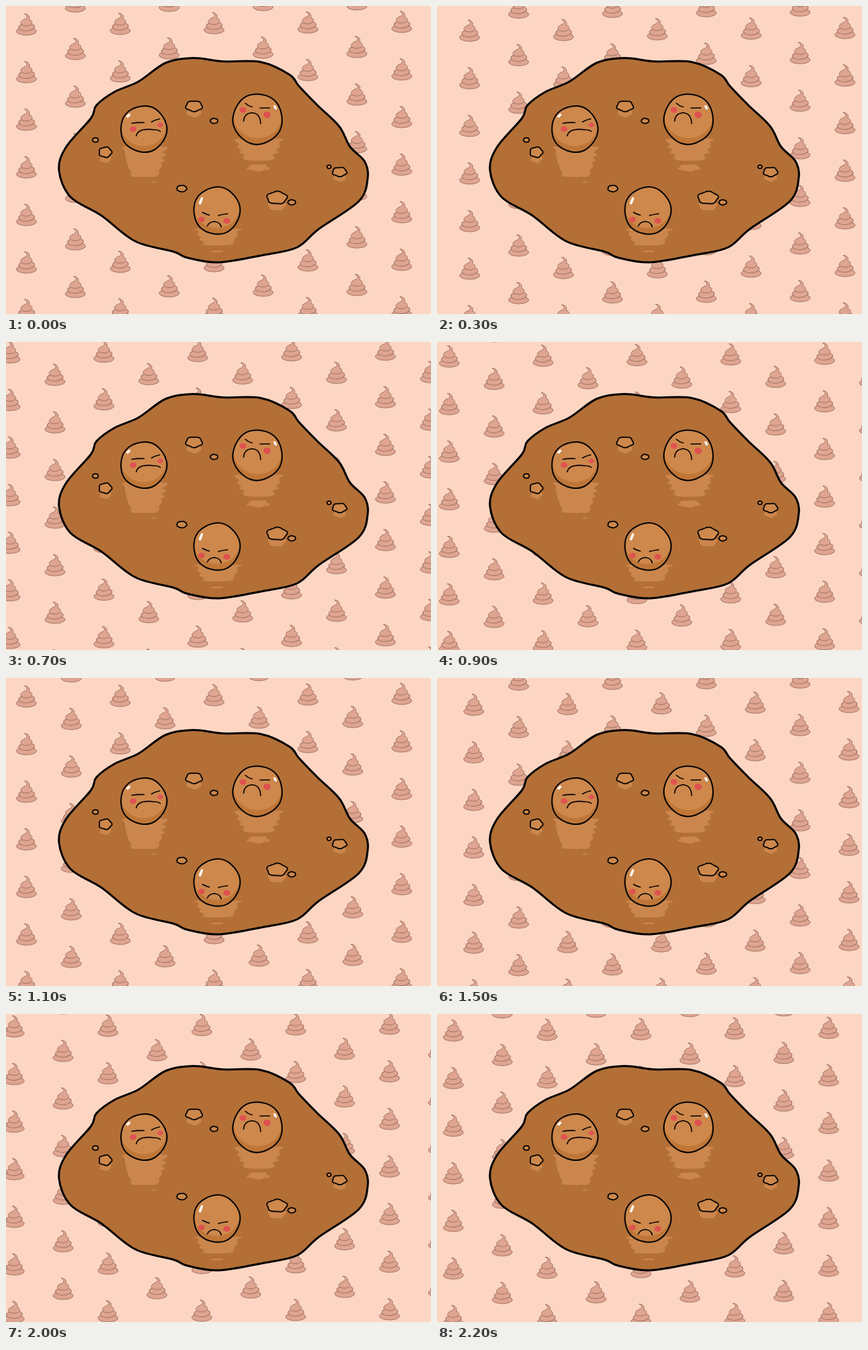
Animation, 625 px wide and 453 px high, one loop 2300 ms. Source, as an HTML page:

```html
<!DOCTYPE html>
<html lang="en">
<head>
<meta charset="utf-8">
<title>Mud puddle</title>
<style>
  html, body { margin: 0; width: 100%; height: 100%; overflow: hidden; background: #fdd6c3; }
  svg { display: block; width: 625px; height: 453px; }
  #tiles { animation: drift 2300ms steps(23, end) infinite; }
  @keyframes drift { to { transform: translate(138px, 69px); } }
  #swirl { fill: #dfa590; stroke: #a07365; stroke-width: 1; stroke-linejoin: round; }
  #puddle { fill: #b36f36; stroke: #000; stroke-width: 3; stroke-linejoin: round; }
  .glint { fill: #ca864d; }
  .shade { fill: #bf7637; }
  .skin { fill: #ce884c; }
  .rim { fill: none; stroke: #000; stroke-width: 2; }
  .pebble { fill: #ce884c; stroke: #000; stroke-width: 1.8; }
  .cheek { fill: #e05150; }
  .ink { fill: none; stroke: #000; stroke-width: 1.6; stroke-linecap: round; }
  .shine { fill: none; stroke: #fff; stroke-width: 3.5; stroke-linecap: round; }
</style>
</head>
<body>
<svg viewBox="0 0 625 453">
  <defs>
    <g id="swirl">
      <ellipse cy="10.300" rx="14.800" ry="5.700"/>
      <ellipse cy="4" rx="11.700" ry="5.400" transform="rotate(-4)"/>
      <path d="M-3-15.500C3-15.500 6-11 4-7C10-6 10 1 2 2C-6 3-11-1-7-5C-4-8 1-8 1-11C1-13-1-14-3-15.500Z"/>
    </g>
  </defs>
  <g id="tiles"></g>
  <path id="puddle"/>
  <g id="mud"></g>
  <g class="ink">
    <path d="M185 172.500Q193 171 203 171.500M214 170.500Q219 167.500 226 166"/>
    <path d="M191.500 191C194 180 210 181 218 182Q224 182 227 184.500"/>
    <path d="M352 143Q356 147 362 148.500M373.500 150.200Q380 149.300 388 150"/>
    <path d="M349.500 169.500Q350 158 362 157Q374 158 374.500 173"/>
    <path d="M289 303.500Q293 306 299 307.500M312.500 308Q318 306.500 326 305.500"/>
    <path d="M296 323.500Q299 317 307 317Q315 318 316.500 325"/>
  </g>
  <path class="shine" d="M178.800 162.500L181.300 160M395 147.500L396.700 150.500M288 283L285.300 290"/>
</svg>
<script>
  const NS = 'http://www.w3.org/2000/svg';
  const $ = id => document.getElementById(id);

  function add(parent, tag, attrs) {
    const el = document.createElementNS(NS, tag);
    for (const k in attrs) el.setAttribute(k, attrs[k]);
    parent.appendChild(el);
  }
  const draw = (name, d) => add($('mud'), 'path', { class: name, d });

  // Closed Catmull-Rom curve through the points.
  function smooth(pts) {
    const at = i => pts[(i + pts.length) % pts.length];
    return pts.reduce((d, p, i) => {
      const a = at(i - 1), q = at(i + 1), b = at(i + 2);
      const c1 = p.map((v, k) => v + (q[k] - a[k]) / 6);
      const c2 = q.map((v, k) => v - (b[k] - p[k]) / 6);
      return `${d}C${c1} ${c2} ${q}`;
    }, 'M' + pts[0]) + 'Z';
  }

  // Ellipse whose radius swells in a few lobes.
  function ring(x, y, rx, ry, wobble = 0, lobes = 5) {
    const pts = Array.from({ length: 30 }, (_, i) => {
      const a = i * Math.PI / 15;
      const r = 1 + wobble * Math.sin(lobes * a + x);
      return [x + rx * r * Math.cos(a), y + ry * r * Math.sin(a)];
    });
    return smooth(pts);
  }

  // Ragged reflection that narrows downwards.
  function ripple(x, y, width, depth) {
    const left = [], right = [];
    for (let s = 0; s <= depth; s += 4) {
      const half = width / 2 * (1 - 0.45 * (s / depth) ** 2);
      left.push([x - half + 3 * Math.sin(s * 0.8 + x), y + s]);
      right.unshift([x + half + 3 * Math.sin(s * 0.7 + y), y + s]);
    }
    return smooth([...left, ...right]);
  }

  function head({ x, y, rx, ry, depth, drip, cheeks }) {
    const outline = ring(x, y, rx, ry, 0.012);
    draw('glint', ripple(x + 1.5, y + ry - 8, rx * 1.75, depth));
    draw('glint', ring(...drip));
    draw('shade', outline);
    draw('skin', ring(x, y - 4, rx - 1, ry - 5));
    draw('rim', outline);
    cheeks.forEach(c => draw('cheek', ring(...c)));
  }

  function pebble(x, y, rx, ry) {
    const lumpy = rx > 9;
    if (lumpy) draw('glint', ring(x, y + ry * 1.2, rx * 0.9, ry * 0.9, 0.08));
    draw('pebble', ring(x, y, rx, ry, lumpy ? 0.07 : 0.03));
  }

  for (let col = -2; col < 6; col++) {
    for (let row = -2; row < 8; row++) {
      const x = 30 + col * 138, y = 27 + row * 70 - col;
      add($('tiles'), 'use', { href: '#swirl', x, y });
      add($('tiles'), 'use', { href: '#swirl', x: x + 72, y: y + 36 });
    }
  }

  const shore = `275,76.5 320,81.5 375,82.5 417,101 431,118 458,146 490,177 506,207 527,228
    532,252 519,287 460,328 428,355 380,366 313,377 266,370 247,361.5 190,346 140,308
    95,281 78,242 88,208 125,165 133,146 160,126 195,111 235,83.5`;
  $('puddle').setAttribute('d', smooth(shore.split(/\s+/).map(p => p.split(',').map(Number))));

  head({ x: 202.5, y: 181, rx: 33.8, ry: 34, depth: 46, drip: [217.5, 258.8, 4, 1],
         cheeks: [[187, 181, 4.8, 3.9], [227, 175, 4, 3.3]] });
  head({ x: 370, y: 166.3, rx: 36.2, ry: 37, depth: 32, drip: [371, 238, 16, 5, 0.12],
         cheeks: [[348.5, 153, 4.8, 4.2], [384, 160, 5.3, 4.7]] });
  head({ x: 310, y: 301, rx: 34, ry: 34.7, depth: 26, drip: [311, 361, 9, 1.3],
         cheeks: [[287.5, 314, 4.8, 4], [324.7, 316, 5, 3.9]] });

  pebble(276.5, 147.3, 12, 7.6);
  pebble(306, 169, 5.5, 3.7);
  pebble(131.5, 197, 4.2, 3.3);
  pebble(146, 215, 9.2, 7.5);
  pebble(258.5, 268.5, 7.2, 4.7);
  pebble(398.5, 282, 14.6, 9);
  pebble(420.3, 288.8, 5.6, 3.7);
  pebble(475, 236.5, 3, 2.5);
  pebble(490.5, 244, 10.3, 6.7);
</script>
</body>
</html>
```
